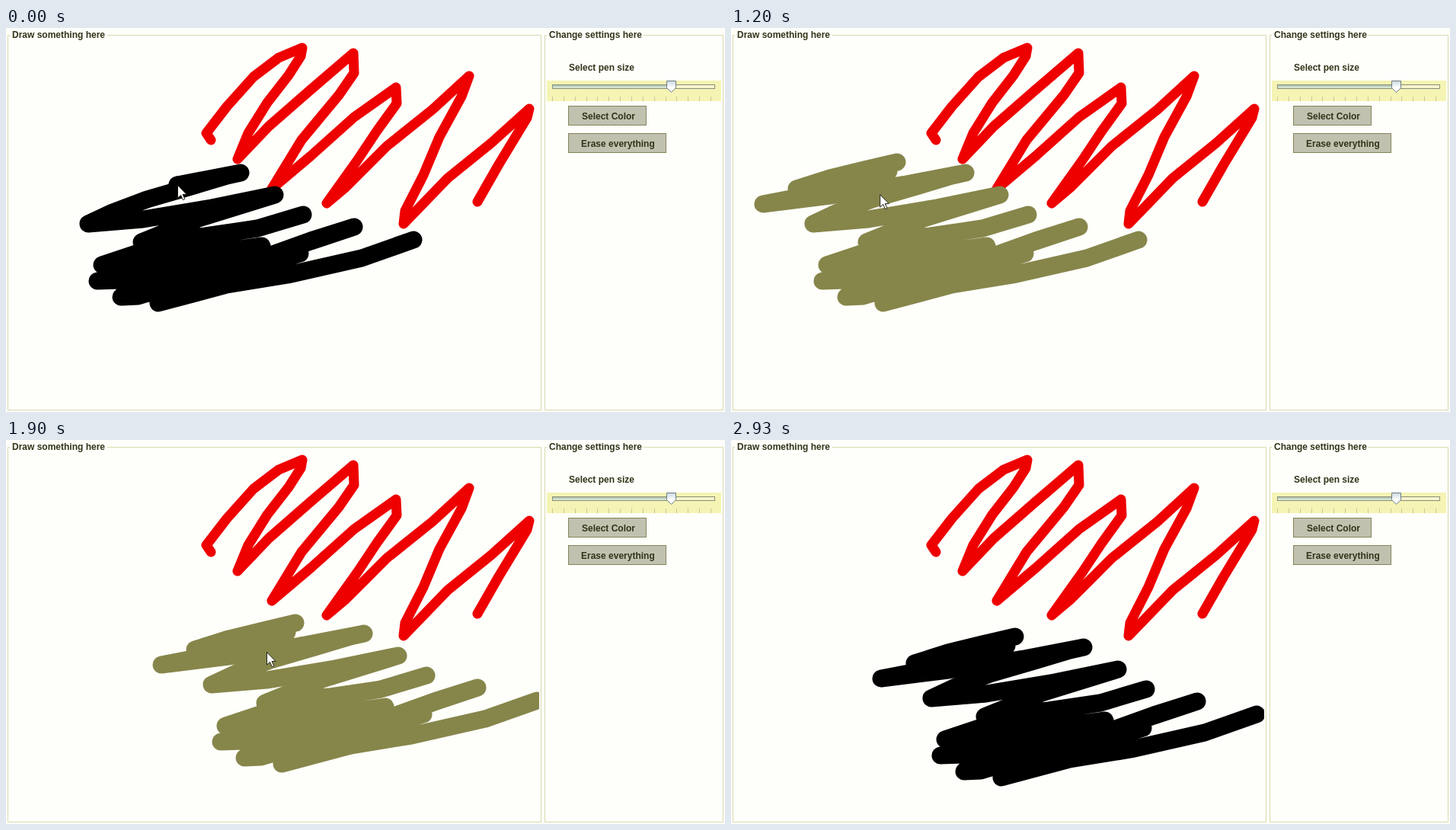
An HTML page for the animation above (3010 ms loop, 944 by 504 pixels).

```html
<!DOCTYPE html>
<html lang="en">
<head>
<meta charset="utf-8">
<title>Drawing panel</title>
<style>
  html, body { margin: 0; width: 100%; height: 100%; overflow: hidden; background: #fefefa; }
  svg { display: block; width: 944px; height: 504px; }
  text { font: bold 12px "Liberation Sans", Arial, sans-serif; fill: #333319; }
  .frame { fill: none; stroke: #d9d9ae; }
  .button { fill: #c1c1b0; stroke: #85855c; }
  .pen { fill: none; stroke-linecap: round; stroke-linejoin: round; }
</style>
</head>
<body>
<svg viewBox="0 0 944 504">
  <defs>
    <linearGradient id="fill" x2="0" y2="1">
      <stop offset="0" stop-color="#a9bfb0"/>
      <stop offset="1" stop-color="#e2f0dc"/>
    </linearGradient>
    <linearGradient id="knob" x2="0" y2="1">
      <stop offset="0" stop-color="#c9d9e0"/>
      <stop offset=".6" stop-color="#ffffff"/>
    </linearGradient>
    <clipPath id="area"><path d="M4 12H700V500H4z"/></clipPath>
  </defs>
  <rect width="944" height="504" fill="#fefefa"/>

  <path class="frame" d="M5 9.5H2.5V501.5H702.5V9.5H133"/>
  <text x="8" y="13">Draw something here</text>
  <path class="frame" d="M710 9.5H707.5V501.5H941.5V9.5H837"/>
  <text x="713" y="13">Change settings here</text>

  <text x="739" y="56">Select pen size</text>
  <rect x="710" y="69" width="229" height="27" fill="#f5f4b4"/>
  <rect x="717.5" y="74.5" width="213" height="5" fill="#f5f4cc" stroke="#8d8f78"/>
  <rect x="718" y="75" width="152" height="4" fill="url(#fill)"/>
  <path id="ticks" stroke="#c6c69a"/>
  <path d="M867.5 69.5H879.5V78.5L873.5 84.5L867.5 78.5z" fill="url(#knob)" stroke="#707c84"/>

  <rect class="button" x="738.5" y="102.5" width="102" height="25"/>
  <text x="756" y="120">Select Color</text>
  <rect class="button" x="738.5" y="138.5" width="128" height="25"/>
  <text x="755" y="156">Erase everything</text>

  <g clip-path="url(#area)">
    <polyline class="pen" stroke="#ee0000" stroke-width="13" points="
      269,147 263,138 290,103 325,64 358,39 389,26 387,37 371,62 343,98 318,138 304,172
      345,129 400,81 456,33 457,59 437,88 388,147 349,211
      400,168 457,117 512,78 513,99 487,135 461,174 421,230
      446,209 500,155 560,107 608,63 598,90 569,143 548,193 524,240 522,257
      580,197 637,151 687,106 684,118 647,179 619,228"/>
    <g id="scribble" class="pen" stroke-width="23">
      <polyline points="
        535,278 467,302 370,324 290,337 200,361
        290,325 386,296 280,320 173,352 151,353
        240,330 350,297 400,279 457,261 400,280 350,298 250,317 150,331 120,332
        230,312 336,286 220,302 126,311
        180,293 262,274 330,263 390,245 330,263 262,273 178,281
        215,266 253,250 353,219 270,236 180,251 108,257
        140,242 185,225 240,209 290,194 308,190 225,206"/>
      <polyline id="tail" points="
        225,206 130,220 42,231 130,214 207,188 150,203 86,211 130,197 175,186 218,176"/>
    </g>
  </g>
  <path id="cursor" d="M.5 .5V17L4.5 13.4L7.4 19.6L9.8 18.5L7 12.4H12z" fill="#fff" stroke="#222218"/>
</svg>
<script>
const LOOP = 3010;
const DRAW = [30, 530];
const SELECTED = [900, 2470];
const GONE = 2920;

// [time, x, y]
const cursorKeys = [
  [530, 218, 176], [570, 212, 178], [670, 154, 195], [800, 165, 203], [1000, 212, 230],
  [1070, 210, 228], [1230, 192, 216], [1370, 190, 216], [1470, 217, 238], [1730, 308, 258],
  [1900, 342, 278], [2060, 345, 287], [2230, 335, 293], [2400, 333, 300], [2670, 333, 301],
  [2780, 560, 240], [2900, 914, 136]
];
const dragKeys = [
  [1370, 0, 0], [1470, 31.5, 23], [1730, 123, 42], [1870, 156, 61], [1900, 162, 64],
  [2060, 166, 74], [2230, 161, 80], [2430, 155, 82]
];

const $ = id => document.getElementById(id);
const scribble = $('scribble'), tail = $('tail'), cursor = $('cursor');
const tailLength = tail.getTotalLength();
const clamp = v => Math.min(1, Math.max(0, v));
const move = (el, x, y) => el.setAttribute('transform', `translate(${x} ${y})`);

function sample(keys, t) {
  let i = 1;
  while (i < keys.length - 1 && keys[i][0] < t) i++;
  const [t0, x0, y0] = keys[i - 1], [t1, x1, y1] = keys[i];
  const k = clamp((t - t0) / (t1 - t0));
  return [x0 + (x1 - x0) * k, y0 + (y1 - y0) * k];
}

function render(t) {
  const drawn = tailLength * clamp((t - DRAW[0]) / (DRAW[1] - DRAW[0]));
  tail.setAttribute('stroke-dasharray', `${drawn + 0.01} ${tailLength * 2}`);

  const selected = t >= SELECTED[0] && t < SELECTED[1];
  scribble.setAttribute('stroke', selected ? '#86864b' : '#000');
  move(scribble, ...sample(dragKeys, t));

  if (t < DRAW[1]) {
    const tip = tail.getPointAtLength(drawn);
    move(cursor, tip.x, tip.y);
  } else {
    move(cursor, ...sample(cursorKeys, t));
  }
  cursor.setAttribute('visibility', t < GONE ? 'visible' : 'hidden');
}

let ticks = '';
for (let i = 0; i < 15; i++) ticks += `M${Math.round(717 + i * 14.85) + 0.5} 90v6`;
$('ticks').setAttribute('d', ticks);

const start = performance.now();
function tick() {
  render((performance.now() - start) % LOOP);
  requestAnimationFrame(tick);
}
tick();
</script>
</body>
</html>
```
